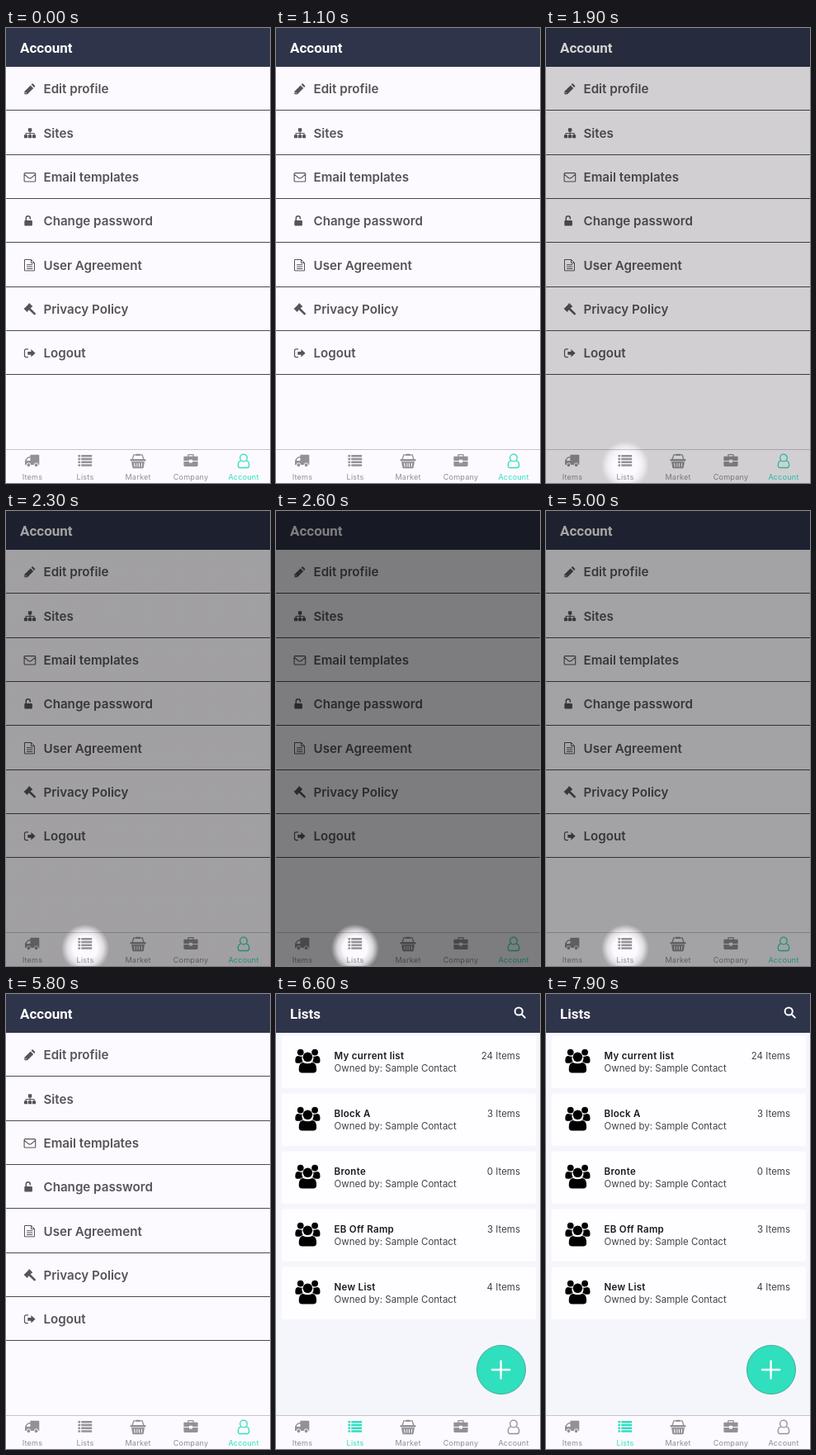
An HTML page that plays this animation: 320 px wide and 551 px high, repeating every 8 s.

```html
<!DOCTYPE html>
<html lang="en">
<head>
<meta charset="utf-8">
<title>Account and lists</title>
<style>
  html, body { margin: 0; width: 100%; height: 100%; overflow: hidden; background: #fcfafe; }
  svg { display: block; width: 100%; height: 100%; font-family: Inter, "Open Sans", sans-serif; }
  .title { font: 600 17px Roboto, sans-serif; fill: #fff; }
  .row { font-size: 15.15px; font-weight: 600; fill: #565459; }
  .card { font-size: 11.5px; fill: #444347; }
  .name { font-weight: 600; letter-spacing: .3px; fill: #19191b; }
  .tab { font-size: 9.1px; letter-spacing: .2px; text-anchor: middle; }
  .line { fill: none; stroke: currentColor; stroke-width: 1.2; stroke-linejoin: round; stroke-linecap: round; }
</style>
</head>
<body>
<svg viewBox="0 0 320 551">
  <defs>
    <radialGradient id="spot" gradientUnits="userSpaceOnUse" cx="96" cy="529.5" r="29">
      <stop offset=".5" stop-color="#000" stop-opacity="0"/>
      <stop offset=".75" stop-color="#000" stop-opacity=".3"/>
      <stop offset="1" stop-color="#000"/>
    </radialGradient>
  </defs>
  <g id="account"></g>
  <g id="lists"></g>
  <g id="tabs"></g>
  <rect id="shade" width="320" height="551" fill="url(#spot)"/>
</svg>
<script>
const LOOP = 8000, SHADE = 0.6;
const FADE_IN = [1540, 2800], FADE_OUT = [4470, 5760], SWITCH = 6200;
const TEAL = '#2fdfbe', PAGE = '#fcfafe';
const $ = id => document.getElementById(id);

const box = (x, y, w, h, r = 0.6) => `<rect x="${x}" y="${y}" width="${w}" height="${h}" rx="${r}"/>`;
const dot = (x, y, r) => `<circle cx="${x}" cy="${y}" r="${r}"/>`;
const solid = d => `<path fill-rule="evenodd" d="${d}"/>`;
const line = (d, width = 1.2) => `<path class="line" style="stroke-width:${width}" d="${d}"/>`;
const text = (x, y, kind, label, extra = '') => `<text x="${x}" y="${y}" class="${kind}" ${extra}>${label}</text>`;
const place = (x, y, color, art) =>
  `<g transform="translate(${x} ${y})" fill="${color}" color="${color}">${art}</g>`;
const header = label => `<rect width="320" height="47" fill="#2e344a"/>` + text(17, 29.5, 'title', label);

// Row icons, drawn around their own centre
const rows = [
  ['Edit profile', solid('M-6.5 6.3V2.8L.8-4.5 4.3-1-3 6.3zM-5.2 3.4v1.7h1.6zM1.7-5.4l1-1q.6-.5 1.2 0l2.3 2.3q.5.6 0 1.2l-1 1z')],
  ['Sites', box(-2, -6, 4.4, 4.2) + [-7, -2, 3].map(x => box(x, 2, 4.2, 4)).join('') +
    line('M.2-2V2M-4.8 2V.2H5.2V2', 1.1)],
  ['Email templates', line('M-5.8-5H5.8q1 0 1 1V4.4q0 1-1 1H-5.8q-1 0-1-1V-4q0-1 1-1zM-6.6-3.2Q-4-1-1.6.9 0 2 1.6.9 4-1 6.6-3.2', 1.1)],
  ['Change password', box(-6.6, -1, 9.6, 6.6, 1) + line('M-4.6-.8V-3.6A2.5 2.5 0 0 1 .4-3.6v.7', 1.5)],
  ['User Agreement', line('M-6-6.7H1.6L5.6-2.7V6.7H-6zM1.6-6.5v3.9h3.8M-3.4-.5H3M-3.4 1.9H3M-3.4 4.3H3', 1)],
  ['Privacy Policy', line('M0 0L5.8 5.6', 2.6) + solid('M-6.4-1.2L-1.2-6.4 2.4-2.8-2.8 2.4z') + line('M-6.4-.8l3.2 3.2M-.8-6.4L2.4-3.2', 1.5)],
  ['Logout', line('M-2.4-4.9H-4.4q-2 0-2 2V2.8q0 2 2 2h2', 1.2) + solid('M-2.6-1.9H1.5V-4.8L6.7 0 1.5 4.8V1.9H-2.6z')],
];

const people = dot(-8.6, -10.4, 3.9) + dot(8.8, -10.4, 3.9) +
  solid('M-15-.6Q-15-5.9-11-5.9q2.4 1.3 4.2.4Q-7.6-2-5.6 1.2q-2.2.1-3.6 1.5h-3.6Q-15 2.7-15-.6zM15.2-.6Q15.2-5.9 11.2-5.9q-2.4 1.3-4.2.4Q7.8-2 5.8 1.2q2.2.1 3.6 1.5H13Q15.2 2.7 15.2-.6z') +
  dot(0.1, -4.7, 5.8) +
  solid('M-10.6 10.4Q-10.6 1.9-5.4 1.9 0 4.4 5.6 1.9 10.8 1.9 10.8 10.4q0 4-4 4H-6.6q-4 0-4-4z');

const owner = 'Sample Contact';
const cards = [['My current list', 24], ['Block A', 3], ['Bronte', 0], ['EB Off Ramp', 3], ['New List', 4]];

// Tab icons, centred likewise
const listBars = [0, 1, 2, 3].map(i => box(-8.6, -7 + i * 3.75, 2.7, 2.4, 0.4) + box(-4.8, -7 + i * 3.75, 13, 2.4, 0.4)).join('');
const tabs = [
  ['Items', solid('M-2.6-7.3H7.3q1 0 1 1V5H-9V1q0-2 1-3l2.2-2.2q.8-.8 2-.8h1.2zM-7-.1h4.4v-3.4h-2L-7-1z') +
    `<g stroke="${PAGE}">${dot(-4.6, 5.2, 2.4)}${dot(4.6, 5.2, 2.4)}</g>`],
  ['Lists', listBars],
  ['Market', box(-9.5, -2, 19, 2.5, 1.2) + solid('M-8 1.3H8L6.7 8.3q-.2 1-1.2 1h-11q-1 0-1.2-1zM-4.8 3l.3 4.5h1.1L-3.7 3zM-1.6 3v4.5h1V3zM1 3v4.5h1V3zM4 3l-.3 4.5h1.1L5.1 3z') +
    line('M-6.8-2l1.7-5.2h2.3M6.8-2L5.1-7.2H2.8', 1.3) + box(-3, -8.2, 6, 2.1, 1)],
  ['Company', solid('M-8.6-5.3H-3.8V-6.8q0-1.3 1.3-1.3h5Q3.8-8.1 3.8-6.8v1.5H8.6V0H2v-1.2h-4V0h-6.6zM-2.5-5.3h5V-6.8h-5zM-8.6 1H-2v1.4h4V1h6.6v4.5q0 1.4-1.4 1.4H-7.2q-1.4 0-1.4-1.4z')],
  ['Account', line('M-3.6.2Q-6.7 1-6.7 5.5q0 3 2.6 3h8.2q2.6 0 2.6-3Q6.7 1 3.6.2M0-7.8A4.3 4.3 0 0 1 0 .8 4.3 4.3 0 0 1 0-7.8z', 1.3)],
];

$('account').innerHTML = `<rect width="320" height="551" fill="${PAGE}"/>` + header('Account') +
  rows.map(([label, art], i) => {
    const y = 74 + i * 53.3;
    return place(28.9, y, '#565459', art) + text(45.5, y + 5.3, 'row', label) +
      `<rect y="${Math.round(99.4 + i * 53.3)}" width="320" height="1" fill="#4b4a4f"/>`;
  }).join('');

$('lists').innerHTML = '<rect width="320" height="551" fill="#f5f6fc"/>' + header('Lists') +
  place(294.2, 21, '#fff', line('M4.6 0A4.6 4.6 0 1 1-4.6 0 4.6 4.6 0 1 1 4.6 0M3.8 3.8L7.6 7.6', 2)) +
  cards.map(([name, count], i) => place(0, i * 70, '#fefdff', box(7, 50.5, 308, 63.5, 3) +
    place(38.3, 81, '#000', people) +
    text(70.5, 79, 'card name', name) + text(70.5, 94, 'card', 'Owned by: ' + owner) +
    text(296, 79, 'card', count + ' Items', 'text-anchor="end"'))).join('') +
  `<circle cx="273" cy="455" r="29.6" fill="${TEAL}" stroke="#3c9c8c" stroke-width=".8"/>` +
  place(272.6, 455, '#fff', line('M-10.6 0H10.6M0-10.6V10.6', 2.4));

function drawTabs(active) {
  $('tabs').innerHTML = `<rect y="510" width="320" height="41" fill="${PAGE}"/><rect y="510" width="320" height="1" fill="#c6c5ca"/>` +
    tabs.map(([label, art], i) => {
      const x = 32 + i * 64, on = label === active;
      return place(x, 524, on ? TEAL : '#929196', art) +
        text(x, 547, 'tab', label, `fill="${on ? TEAL : '#8f8e93'}"`);
    }).join('');
}

const ramp = (t, [from, to]) => Math.min(1, Math.max(0, (t - from) / (to - from)));
let active;

function render() {
  const t = performance.now() % LOOP;
  const screen = t < SWITCH ? 'Account' : 'Lists';
  if (screen !== active) {
    active = screen;
    $('lists').style.display = screen === 'Lists' ? '' : 'none';
    drawTabs(screen);
  }
  $('shade').style.opacity = SHADE * (ramp(t, FADE_IN) - ramp(t, FADE_OUT));
  requestAnimationFrame(render);
}
render();
</script>
</body>
</html>
```
